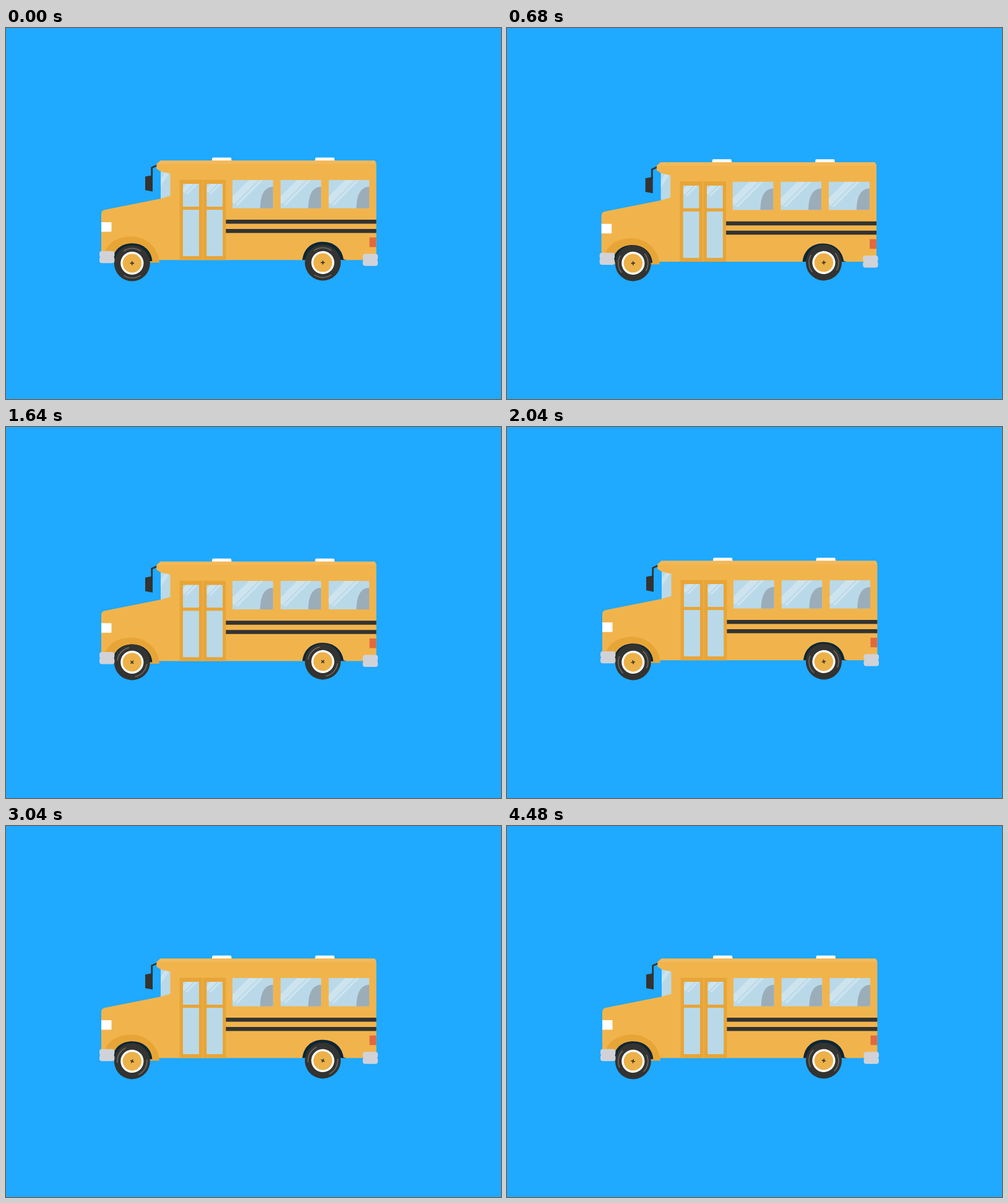
An HTML page for the animation above (4.52 s loop, 800 px wide and 600 px high).

```html
<!DOCTYPE html>
<html lang="en">
<head>
<meta charset="utf-8">
<title>School bus</title>
<style>
  html, body { margin: 0; width: 100%; height: 100%; overflow: hidden; background: #1fa9ff; }
  svg { display: block; width: 800px; height: 600px; }
  .body { fill: #f1b44c; }
  .trim { fill: #e8a537; }
  .glass { fill: #b9d9e9; }
  .dark { fill: #333331; }
  .glare { fill: #fff; opacity: .28; }
  .metal { fill: #d0d2d8; }
  .white { fill: #fff; }
</style>
</head>
<body>
<svg viewBox="0 0 800 600">
  <defs>
    <clipPath id="paneClip"><rect width="66" height="46" rx="1"/></clipPath>
    <clipPath id="doorClip"><rect width="26" height="37" rx="1"/></clipPath>
    <g id="pane" clip-path="url(#paneClip)">
      <rect class="glass" width="66" height="46"/>
      <path class="glare" d="M0 36V27L27 0H42L3 39ZM5 40L45 0H50L9 41Z"/>
      <path d="M45 46C45 28 50 11 66 11V46Z" fill="#9badb9"/>
    </g>
    <g id="doorPane">
      <g clip-path="url(#doorClip)">
        <rect class="glass" width="26" height="37"/>
        <path class="glare" d="M0 13V6L6 0H17L2 15ZM4 16L20 0H24L7 17Z"/>
      </g>
      <rect class="glass" y="42" width="26" height="75" rx="1"/>
    </g>
    <path id="lamp" class="white" d="M0 5.5L.7 1.2Q1 0 2 0H30Q31 0 31.3 1.2L32 5.5Z"/>
    <g id="bumper" class="metal">
      <rect width="24.4" height="10.5" rx="4"/>
      <rect y="9" width="24.4" height="10.5" rx="4"/>
      <rect x="1" y="5" width="22.4" height="9"/>
    </g>
    <g id="wheel">
      <circle class="dark" r="29"/>
      <path d="M-14-19.5A24 24 0 0 1 14-19.5M-14 19.5A24 24 0 0 0 14 19.5" fill="none" stroke="#6b6864" stroke-width="1.7"/>
      <circle class="white" r="18.6"/>
      <circle r="15.2" fill="#edb149"/>
      <path d="M-3.2 0H3.2M0-3.2V3.2" stroke="#333331" stroke-width="1.6"/>
    </g>
  </defs>

  <rect width="800" height="600" fill="#1fa9ff"/>
  <g id="bus">
    <use href="#lamp" x="332.7" y="209.4"/>
    <use href="#lamp" x="499.3" y="209.4"/>
    <path class="glass" d="M250 230L267 234V273L250 277Z"/>
    <path class="glare" d="M250 244L257 233H265L250 256Z"/>
    <path d="M244.5 222L235.7 225.8V242" fill="none" stroke="#333331" stroke-width="2.8"/>
    <path class="dark" d="M225 240.2L237 238V264.6L225 262.3Z"/>
    <path class="body" d="M249.5 214.5H596L598.5 219V375.3H154V301Q154 295.2 159.5 294L250 276L265.5 271.5V235.5L250 232L243.3 227.5V220Z"/>
    <path d="M243.3 220L249.5 214.5H596L598.5 220Z" fill="#f4b858"/>

    <rect class="trim" x="280.6" y="245.4" width="74.8" height="129.9"/>
    <rect class="body" x="317.4" y="245.4" width="1.2" height="129.9"/>
    <use href="#doorPane" x="286" y="252"/>
    <use href="#doorPane" x="324.2" y="252"/>
    <use href="#pane" x="365.8" y="245.7"/>
    <use href="#pane" x="443.5" y="245.7"/>
    <use href="#pane" x="521.3" y="245.7"/>
    <path class="dark" d="M355.4 310H598.5V316.5H355.4ZM355.4 325H598.5V331.5H355.4Z"/>
    <rect x="587.5" y="338.8" width="11" height="15.5" fill="#e0693e"/>
    <path class="white" d="M154 314H169.5Q170.5 314 170.5 315V328.4Q170.5 329.4 169.5 329.4H154Z"/>

    <path class="trim" d="M160 379.5V363C164 347 182 337.3 202 337.3C228 337.3 246 356 248 379.5Z"/>
    <path d="M172 375.5C174 358 187 348.3 204 348.3C222 348.3 235 360 236.3 377L204 379Z" fill="#0d2634"/>
    <path d="M479 375.3C481 357 494 345.8 512 345.8C530 345.8 543 357 545.5 374L550 375.3Z" fill="#0d2634"/>
    <use href="#bumper" x="576.6" y="365.2"/>
  </g>
  <use id="front" href="#wheel"/>
  <use id="rear" href="#wheel"/>
  <g id="nose"><use href="#bumper" x="151" y="360.8"/></g>
</svg>
<script>
  const LOOP = 4520, STEP = 40, SPIN = 360 / 2600;
  // time, x, y of the bouncing body
  const bounce = [
    [0, 0, 0], [240, -.4, -4], [460, -.3, 5.2], [720, -1.4, 2.6],
    [960, -.3, 0], [1120, 0, .4], [1560, 0, 3.4], [1720, 0, 3.1],
    [2040, 0, 2], [2260, 0, 0], [LOOP, 0, 0]
  ];
  const get = id => document.getElementById(id);
  const move = (id, x, y, turn = 0) =>
    get(id).setAttribute("transform", `translate(${x} ${y}) rotate(${turn})`);

  function offset(t) {
    const i = bounce.findIndex(k => k[0] > t);
    const a = bounce[i - 1], b = bounce[i];
    const p = (t - a[0]) / (b[0] - a[0]);
    const e = (1 - Math.cos(Math.PI * p)) / 2;
    return [a[1] + (b[1] - a[1]) * e, a[2] + (b[2] - a[2]) * e];
  }

  function draw() {
    const t = Math.floor(performance.now() % LOOP / STEP) * STEP;
    const [x, y] = offset(t);
    move("bus", x, y);
    move("nose", x, y);
    move("front", 203.8, 380.4, -t * SPIN);
    move("rear", 512, 379.4, -t * SPIN);
    requestAnimationFrame(draw);
  }
  draw();
</script>
</body>
</html>
```
